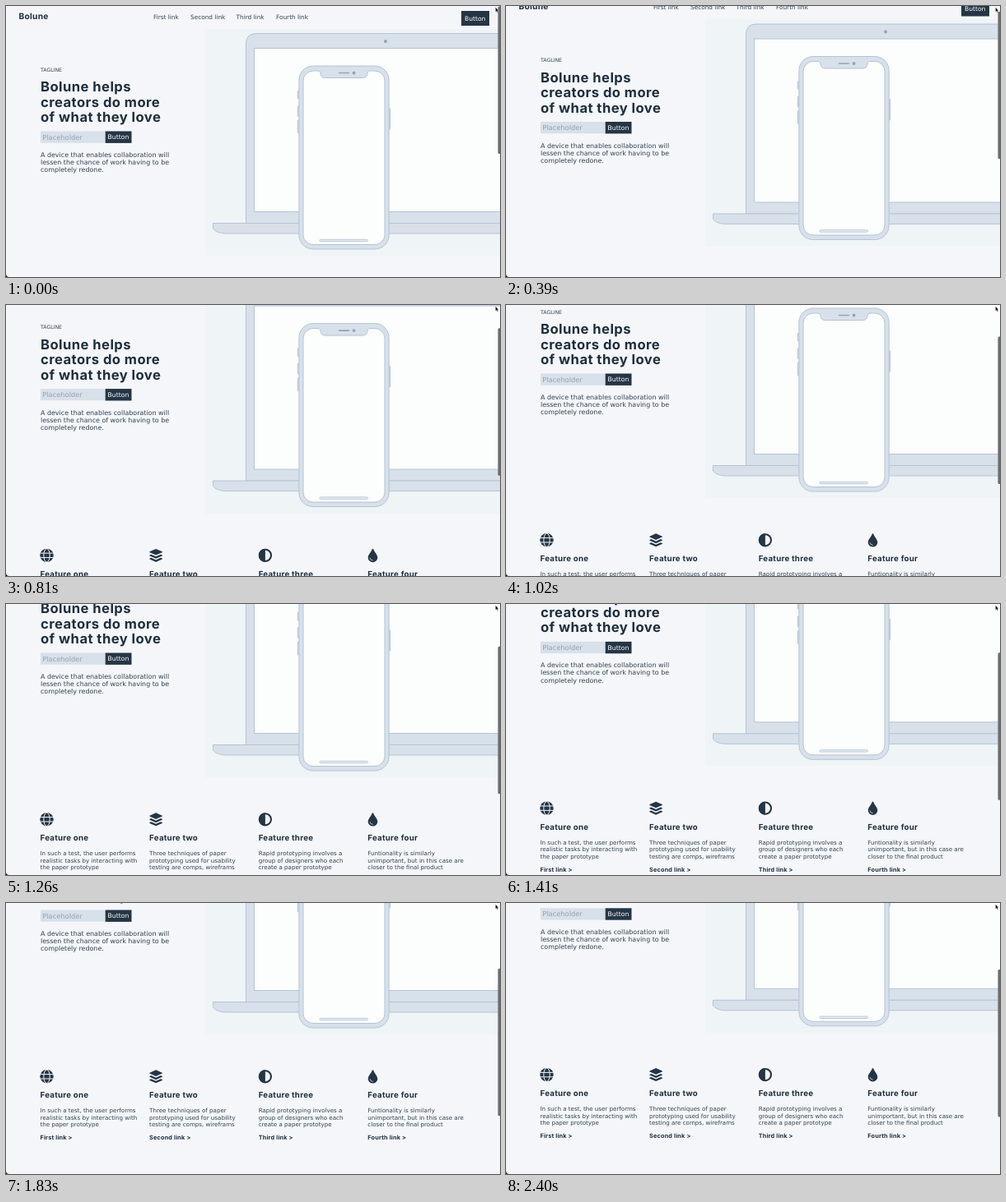
Write an HTML page that moves like this. It is 600 px wide and 330 px high and loops after 2430 ms.

```html
<!DOCTYPE html>
<html lang="en">
<head>
<meta charset="utf-8">
<title>Landing page scroll</title>
<style>
  html, body { margin: 0; width: 100%; height: 100%; overflow: hidden; background: #f4f6fa; }
  svg { display: block; width: 600px; height: 330px; }
  text { font-family: "DejaVu Sans", sans-serif; fill: #34414f; white-space: pre; text-rendering: geometricPrecision; }
  .bold { font-family: Inter, sans-serif; font-weight: 700; fill: #1f2e3e; letter-spacing: .027em; }
  .light { fill: #fff; }
  .hint { fill: #93a1b1; }
  .dark { fill: #253545; }
  .body { fill: #d8e0ea; stroke: #b4c4d4; }
  .screen { fill: #fcfdfd; stroke: #b4c4d4; }
  .lens { fill: #94a4b8; }
</style>
</head>
<body>
<svg viewBox="0 0 600 330">
  <g id="page">
    <rect x="242" y="28" width="358" height="276" fill="#eff4f7"/>

    <!-- laptop -->
    <path class="body" d="M291.5 264.5V46Q291.5 33.5 304 33.5H610V264.5Z"/>
    <rect class="screen" x="301.5" y="51.5" width="310" height="199"/>
    <circle class="lens" cx="461" cy="43" r="2"/>
    <path class="body" d="M251.5 264.5H610V277H267Q255 276.5 251.5 271Z"/>

    <!-- phone -->
    <g class="body">
      <rect x="354.3" y="103" width="4" height="10" rx="1"/>
      <rect x="354.3" y="121.5" width="4" height="13" rx="1"/>
      <rect x="354.3" y="139" width="4" height="16" rx="1"/>
      <rect x="462.5" y="124.5" width="4" height="26" rx="1"/>
      <rect x="355.9" y="73" width="109.2" height="223" rx="17"/>
    </g>
    <rect class="screen" x="361" y="79" width="99" height="211.5" rx="12"/>
    <path class="body" d="M379.5 79Q382 79 382 81.5Q382 87.5 388 87.5H433Q439 87.5 439 81.5Q439 79 441.5 79"/>
    <path fill="#d8e0ea" d="M380 77.5H441V79.6H380Z"/>
    <path d="M404.5 81.5H416.5" stroke="#94a4b8" stroke-width="1.6" stroke-linecap="round"/>
    <circle class="lens" cx="422.6" cy="81.5" r="1.9"/>
    <rect x="381" y="284.3" width="58.5" height="2.4" rx="1.2" fill="#e9eef3" stroke="#b4c4d4" stroke-width=".9"/>

    <rect class="dark" x="553" y="6" width="34" height="18"/>
    <rect x="42" y="152.5" width="79" height="14.2" fill="#d8e0ea"/>
    <rect class="dark" x="120.7" y="152.5" width="31.8" height="14.4"/>
  </g>
  <g id="thumb"><rect x="597.5" y="0.5" width="4" height="179.5" rx="1.5" fill="#6c6d70"/></g>
  <path d="M594.5 1.5V7.3L595.8 6.2L596.8 8.2L597.7 7.8L596.8 5.8H598.4Z" fill="#111" stroke="#fff" stroke-width=".3"/>
  <path d="M0 326Q0 330 4 330H0Z" fill="#111"/>
</svg>
<script>
const page = document.getElementById("page");
const thumb = document.getElementById("thumb");
const add = markup => page.insertAdjacentHTML("beforeend", markup);

function text(x, y, size, lines, kind = "", pitch = 0) {
  lines.split("|").forEach((line, i) =>
    add(`<text x="${x}" y="${y + i * pitch}" font-size="${size}" class="${kind}">${line}</text>`));
}

// header and hero
text(15.5, 15.6, 10.2, "Bolune", "bold");
[[179, "First"], [224, "Second"], [279.5, "Third"], [328, "Fourth"]]
  .forEach(([x, name]) => text(x, 15.5, 7.35, name + " link"));
text(557, 17.8, 7.6, "Button", "light");
text(42, 79.6, 6.2, "TAGLINE");
text(42, 104.3, 16.6, "Bolune helps|creators do more|of what they love", "bold", 18.4);
text(44.3, 162.5, 8.3, "Placeholder", "hint");
text(123.6, 162.4, 7.7, "Button", "light");
text(42, 184, 7.95,
  "A device that enables collaboration will|lessen the chance of work having to be|completely redone.", "", 9.1);

// icons are centred on their own origin
const globe = `<circle r="8.2" class="dark"/>
  <g fill="none" stroke="#f4f6fa" stroke-width="1"><ellipse rx="3.7" ry="8.2"/><path d="M-8.2-2.7H8.2M-8.2 2.7H8.2"/></g>`;
const layers = `<g class="dark"><path d="M-7.6-4.6L0-8L7.6-4.6Q8.4-4.1 7.6-3.7L0-.3L-7.6-3.7Q-8.4-4.1-7.6-4.6Z"/>
  <path id="edge" d="M-7.6-.4L-5.8-1.2L0 1.4L5.8-1.2L7.6-.4Q8.4 0 7.6 .5L0 3.9L-7.6 .5Q-8.4 0-7.6-.4Z"/>
  <use href="#edge" y="4.1"/></g>`;
const contrast = `<circle r="7.1" fill="none" stroke="#253545" stroke-width="2.1"/><path class="dark" d="M0-8A8 8 0 0 0 0 8Z"/>`;
const drop = `<path class="dark" d="M-.8-7.6Q0-8.7 .8-7.6C2-3.8 5.8-.8 5.8 2.7A5.8 5.6 0 0 1-5.8 2.7C-5.8-.8-2-3.8-.8-7.6Z"/>
  <path d="M-3.5 3.2Q-3.1 5.9-.2 6.1" fill="none" stroke="#f4f6fa" stroke-width=".7" stroke-linecap="round"/>`;

[
  ["one", "First", globe, 8, "In such a test, the user performs|realistic tasks by interacting with|the paper prototype"],
  ["two", "Second", layers, 8, "Three techniques of paper|prototyping used for usability|testing are comps, wireframs"],
  ["three", "Third", contrast, 8.2, "Rapid prototyping involves a|group of designers who each|create a paper prototype"],
  ["four", "Fourth", drop, 6.2, "Funtionality is similarly|unimportant, but in this case are|closer to the final product"],
].forEach(([count, ordinal, icon, half, copy], i) => {
  const x = 41.5 + i * 132.6;
  add(`<g transform="translate(${x + half} 355.3)">${icon}</g>`);
  text(x, 381.4, 9.7, "Feature " + count, "bold");
  text(x, 399.4, 7.1, copy, "", 8.5);
  text(x, 432.2, 7.25, ordinal + " link &gt;", "bold");
});

// scroll position over time: [ms, px]
const LOOP = 2430, STEP = 30;
const stops = [[0, 0], [270, 0], [630, 34.5], [1020, 69], [1260, 93], [1590, 123],
  [1830, 144], [1950, 145.3], [2400, 146.2], [LOOP, 146.2]];

function scrollAt(t) {
  const i = stops.findIndex(([end]) => end > t);
  const [t0, y0] = stops[i - 1], [t1, y1] = stops[i];
  return y0 + (y1 - y0) * (t - t0) / (t1 - t0);
}

const start = performance.now();
function draw() {
  const t = Math.max(0, performance.now() - start) % LOOP;
  const y = scrollAt(Math.floor(t / STEP) * STEP);
  page.setAttribute("transform", `translate(0 ${-y})`);
  thumb.setAttribute("transform", `translate(0 ${y * 0.55})`);
  requestAnimationFrame(draw);
}
draw();
</script>
</body>
</html>
```
